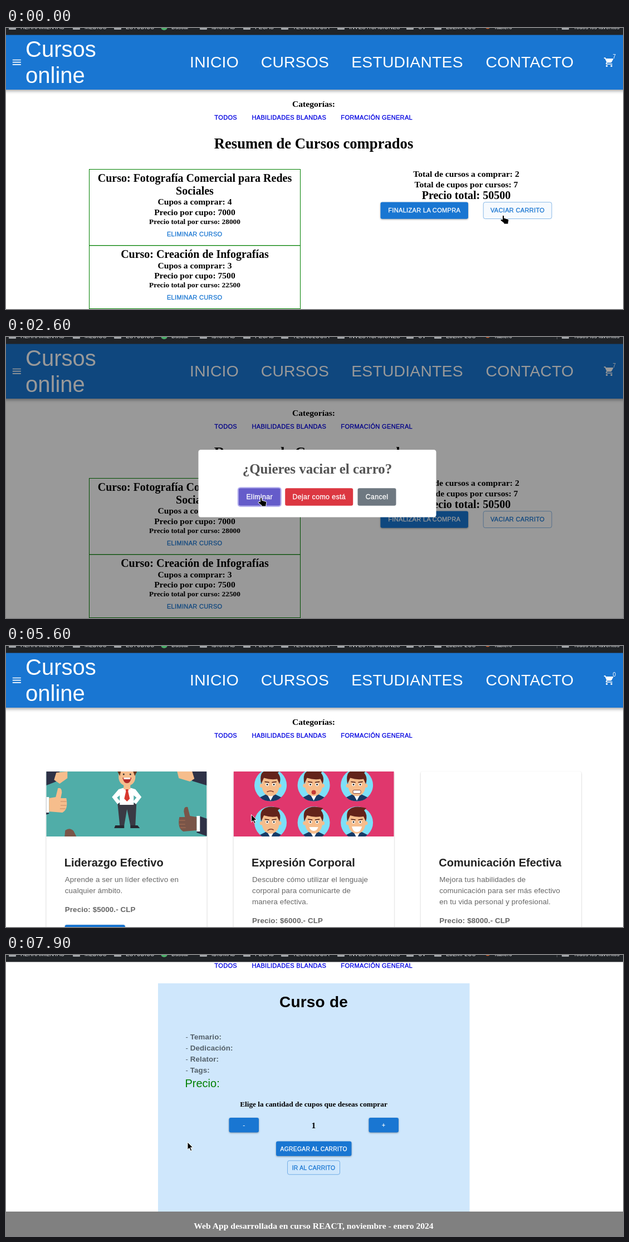
Recreate the animation shown at these times as an HTML page. Size 1108 by 506 pixels, loop 8000 ms.

```html
<!DOCTYPE html>
<html lang="es">
<head>
<meta charset="utf-8">
<title>Cursos online</title>
<style>
  html, body { margin: 0; width: 100%; height: 100%; overflow: hidden; background: #fff; }
  svg { display: block; }
  .sans { font-family: "Liberation Sans", Arial, sans-serif; }
  .serif { font-family: "Liberation Serif", "Times New Roman", serif; font-weight: bold; }
  .label { stroke-width: .3px; letter-spacing: .0286em; }
  .raised { filter: drop-shadow(0 1.5px 1.5px rgba(0,0,0,.35)); }
  .bar { filter: drop-shadow(0 2px 3px rgba(0,0,0,.4)); }
  .card { filter: drop-shadow(0 1px 1px rgba(0,0,0,.28)); }
</style>
</head>
<body>
<svg id="stage" width="1108" height="506" viewBox="0 0 1108 506"></svg>
<script>
const BLUE = '#1976d2', LINK = '#0000e0', MID = 552.5;

// Drawing helpers
const text = (x, y, str, size, { font = 'sans', fill = '#000', anchor = 'middle', more = '' } = {}) =>
  `<text x="${x}" y="${y}" class="${font}" font-size="${size}" fill="${fill}" text-anchor="${anchor}" ${more}>${str}</text>`;
const serif = (x, y, str, size, fill = '#000') => text(x, y, str, size, { font: 'serif', fill });
const label = (x, y, str, fill, size = 11.05) =>
  text(x, y, str, size, { font: 'sans label', fill, more: `stroke="${fill}"` });
const left = (x, y, str, size, fill, more = '') => text(x, y, str, size, { fill, more, anchor: 'start' });
const rect = (x, y, w, h, fill, more = '') =>
  `<rect x="${x}" y="${y}" width="${w}" height="${h}" fill="${fill}" ${more}/>`;
const circle = (x, y, r, fill, more = '') => `<circle cx="${x}" cy="${y}" r="${r}" fill="${fill}" ${more}/>`;
const path = (d, fill, more = '') => `<path d="${d}" fill="${fill}" ${more}/>`;
const line = (d, color, width) =>
  path(d, 'none', `stroke="${color}" stroke-width="${width}" stroke-linecap="round" stroke-linejoin="round"`);
const group = (id, body, more = '') => `<g id="${id}" ${more}>${body}</g>`;
const filled = (x, y, w, h, str, size, id = '') =>
  rect(x, y, w, h, BLUE, `rx="3.3" class="raised" ${id && `id="${id}"`}`) +
  label(x + w / 2, y + h / 2 + 3.8, str, '#fff', size);
const outlined = (x, y, w, h, str, size, id = '') =>
  rect(x, y, w, h, 'transparent', `rx="3.3" stroke="${BLUE}" stroke-opacity=".5" ${id && `id="${id}"`}`) +
  label(x + w / 2, y + h / 2 + 3.8, str, BLUE, size);

// Browser bookmarks strip
function bookmarks() {
  const folders = [[5, 'HERRAMIENTAS'], [120, 'MEDIOS'], [194, 'ESTUDIOS'], [348, 'IDIOMAS'], [426, 'PECAS'],
    [494, 'TECNOLOGIA'], [595, 'INVESTIGACIONES'], [719, 'CV'], [769, 'EJEMPLOS'], [998, 'Todos los favoritos']];
  const name = (x, str) => left(x, 1.6, str, 10, '#e3e5e8');
  return rect(0, 0, 1108, 12.5, '#202327') +
    folders.map(([x, str]) => rect(x, -6, 13, 9, '#a3a6aa', 'rx="1"') + name(x + 21, str)).join('') +
    circle(284, -2, 6, '#4caf6a') + name(297, 'Buscar') +
    circle(865, -3, 4.5, '#d9642f') + name(876, 'Tablero') + rect(989, 0, 1, 4, '#5b5e63');
}

function header() {
  const nav = [[374, 'INICIO'], [519, 'CURSOS'], [720.5, 'ESTUDIANTES'], [940.5, 'CONTACTO']];
  const burger = 'M3 18h18v-2H3zM3 13h18v-2H3zM3 6v2h18V6z';
  const trolley = 'M7 18a2 2 0 1 0 .01 0zM1 2v2h2l3.6 7.6-1.35 2.4C4.5 15.4 5.5 17 7 17h12v-2H7.4l-.2-.4.9-1.6h7.45' +
    'c.75 0 1.4-.4 1.75-1l3.6-6.5c.4-.7-.1-1.5-.9-1.5H5.2l-.9-2zM17 18a2 2 0 1 0 .01 0z';
  return rect(-20, 12, 1150, 99, BLUE, 'class="bar"') +
    path(burger, '#fff', 'transform="translate(9.3 51.7) scale(.833)"') +
    group('brandTwoLines', left(35, 52, 'Cursos', 40, '#fff') + left(35, 99, 'online', 40, '#fff')) +
    group('brandOneLine', left(35, 75.5, 'Cursos online', 40, '#fff')) +
    group('nav', nav.map(([x, str]) => text(x, 71, str, 28.33, { fill: '#fff', more: 'letter-spacing=".2"' })).join('')) +
    group('basket', path(trolley, '#fff', 'transform="translate(1073 51.7) scale(.833)"') +
      text(1092.3, 55, '<tspan id="count">7</tspan>', 10, { fill: '#fff' }));
}

const categories = () => serif(MID, 142, 'Categorías:', 15.6) +
  label(394.7, 164.5, 'TODOS', LINK) + label(508.3, 164.5, 'HABILIDADES BLANDAS', LINK) +
  label(665.7, 164.5, 'FORMACIÓN GENERAL', LINK);

const footer = y => rect(-20, y, 1150, 52, '#808080') +
  serif(MID, y + 31, 'Web App desarrollada en curso REACT, noviembre - enero 2024', 15.6, '#fff');

function cart() {
  const item = (top, h, titles, seats, price, total) => {
    const y = top + 23 * titles.length;
    return rect(149.5, top, 379, h, 'none', 'stroke="#008000"') +
      titles.map((s, i) => serif(339, top + 22.5 + 22.9 * i, s, 20)).join('') +
      serif(339, y + 17.8, `Cupos a comprar: ${seats}`, 15.6) + serif(339, y + 36, `Precio por cupo: ${price}`, 15.6) +
      serif(339, y + 52.3, `Precio total por curso: ${total}`, 13.33) + label(338.7, y + 74, 'ELIMINAR CURSO', BLUE);
  };
  return serif(MID, 217, 'Resumen de Cursos comprados', 26.67) +
    item(254.5, 137, ['Curso: Fotografía Comercial para Redes', 'Sociales'], 4, 7000, 28000) +
    item(391.8, 113.7, ['Curso: Creación de Infografías'], 3, 7500, 22500) +
    serif(826.5, 268, 'Total de cursos a comprar: 2', 15.6) + serif(826.5, 286.5, 'Total de cupos por cursos: 7', 15.6) +
    serif(826.5, 308, 'Precio total: 50500', 20) +
    filled(672.5, 313.5, 157.5, 30.3, 'FINALIZAR LA COMPRA') +
    outlined(857.2, 313.7, 122.8, 29.8, 'VACIAR CARRITO', 11.05, 'emptyButton');
}

const emptyCart = () => serif(MID, 217, 'No hay cursos en el carrito', 26.67) +
  filled(479.5, 265.5, 146, 30.5, 'VOLVER A LA TIENDA', 11.05, 'backButton') + footer(338);

// Card pictures, 288 by 117
const SKIN = '#f6bd8c', SUIT = '#2e3146', BROWN = '#7a5548';
function leaderPicture() {
  const fist = (x, y, skin, dir) => `<g transform="translate(${x} ${y}) scale(${dir} 1)">` +
    path('M-40 2L-10 -8L-6 22L-40 34z', SUIT) + rect(-12, -8, 6, 28, '#fff') +
    path('M-6 -6L6 -8L10 -24Q17 -26 17 -16L15 -6L25 -6Q29 14 18 20L-6 18z', skin) +
    line('M15 0h10M15 7h10M14 13h9', '#b97d58', .8) + '</g>';
  const sleeve = (d, hand) => path(d, SUIT) + hand;
  return rect(0, 0, 288, 117, '#50ada8') +
    sleeve('M0 0H24L18 18L0 25z', path('M18 2L38 0L38 12L24 22L14 15z', SKIN)) +
    sleeve('M288 0H258L262 17L288 25z', path('M262 0H235L238 12L258 18L266 13z', SKIN)) +
    fist(11, 54, SKIN, 1) + fist(264, 88, BROWN, -1) +
    path('M33 117L34 106Q42 100 49 107L54 117z', BROWN) +
    path('M128 57L132 97H140L145 68L151 97H160L162 57z', '#3a3a44') +
    path('M124 97H140V102H122zM151 97H164L168 102H151z', '#27272f') +
    path('M130 32Q145 26 160 32L171 46L161 59L156 54L162 47L157 43V60H132V43L127 47L133 54L128 59L118 46z', '#fff') +
    path('M142 31h6l-1 5 3 13-5 5-5-5 3-13z', '#d8382f') + rect(139, 20, 12, 12, SKIN) +
    path('M130 0H160V12Q158 25 145 26Q132 25 130 12z', SKIN) + path('M128 0H134L132 8zM156 0H163L159 8z', '#6b3920') +
    path('M137 11H153Q151 21 145 21Q139 21 137 11z', '#b32c2a') + rect(139, 11, 12, 3, '#fff') +
    circle(139, 5, 1.5, '#333') + circle(151, 5, 1.5, '#333');
}

function facesPicture() {
  const mouths = [line('M-6 12Q0 9 5 12', '#7a3328', 1.5), circle(0, 13, 4, '#c43b34'),
    rect(-7, 9, 14, 6, '#fff', 'rx="2" stroke="#8a4438"'), line('M-5 14Q0 10 5 13', '#7a3328', 1.5),
    path('M-8 8H8Q6 15 0 15Q-6 15 -8 8z', '#fff'), path('M-9 7H9Q7 17 0 17Q-7 17 -9 7z', '#fff')];
  const face = (mouth, i) => `<g transform="translate(${66.5 + 77.5 * (i % 3)} ${i < 3 ? 24.5 : 92})">` +
    circle(0, 0, 29, '#7ddff8') + path('M-19 22L-7 16H7L19 22Q12 29 0 29Q-12 29 -19 22z', '#173a66') +
    path('M-7 15H7L0 28z', '#fff') + path('M-15 -14H15V6Q12 19 0 20Q-12 19 -15 6z', SKIN) +
    circle(-16, 1, 3.5, SKIN) + circle(16, 1, 3.5, SKIN) +
    path('M-17 -2Q-20 -20 -13 -24Q-4 -32 17 -26L13 -22Q20 -14 16 -2L12 -11Q0 -9 -12 -13z', '#63231a') +
    circle(-6, -1, 2.8, '#fff') + circle(6, -1, 2.8, '#fff') + circle(-6, -1, 1.4, '#222') + circle(6, -1, 1.4, '#222') +
    line('M-10 -6L-3 -5M10 -6L3 -5', '#4a1a12', 1.6) + mouth + '</g>';
  return rect(0, 0, 288, 117, '#e0376d') + mouths.map(face).join('');
}

function boardPicture() {
  const profile = 'M33 117Q34 95 25 77Q9 57 13 27Q18 8 31 -5M99 -5Q113 9 112 31L110 42L121 62Q122 67 113 68' +
    'L115 75L111 79L113 84Q113 98 101 97Q84 93 83 102L85 117';
  const letter = (x, y, str, fill) => text(x, y, str, 15, { font: 'serif', fill });
  return '<defs><radialGradient id="board"><stop offset="0" stop-color="#36665b"/>' +
    '<stop offset="1" stop-color="#1b302d"/></radialGradient></defs>' + rect(0, 0, 288, 117, 'url(#board)') +
    line(profile, '#d8b21e', 1.7) + `<g transform="translate(285 0) scale(-1 1)">${line(profile, '#eef2ef', 1.7)}</g>` +
    letter(28, 43, 'A', '#e8c62e') + letter(97, 43, 'B', '#e8c62e') +
    line('M35 39Q45 38 41 30Q38 22 46 25Q53 50 51 30Q52 19 57 26Q62 55 62 28Q66 16 70 25Q62 50 73 43Q79 18 82 24Q76 50 90 38', '#d8b21e', 1.4) +
    letter(191, 38, 'A', '#f4f4f0') + letter(259, 39, 'B', '#f4f4f0') + line('M200 35H252M248 32l4 3-4 3', '#f4f4f0', 1.3);
}

function shop() {
  const courses = [
    [72.3, leaderPicture(), 'Liderazgo Efectivo', ['Aprende a ser un líder efectivo en', 'cualquier ámbito.'], 5000],
    [408.6, facesPicture(), 'Expresión Corporal', ['Descubre cómo utilizar el lenguaje', 'corporal para comunicarte de', 'manera efectiva.'], 6000],
    [744.8, boardPicture(), 'Comunicación Efectiva', ['Mejora tus habilidades de', 'comunicación para ser más efectivo', 'en tu vida personal y profesional.'], 8000]];
  const card = ([x, picture, title, lines, price], i) => {
    const tx = x + 33.5, y = 425 + 20 * lines.length;
    return rect(x, 226, 288.3, 346, '#fff', 'rx="3.3" class="card"') +
      `<svg id="picture${i}" x="${x}" y="226" width="288.3" height="117">${picture}</svg>` +
      left(tx - 1, 396.7, title, 20, '#212121', 'font-weight="bold"') +
      lines.map((s, n) => left(tx, 425 + 20 * n, s, 13.33, '#666', 'letter-spacing=".125"')).join('') +
      left(tx, y + 13.5, `Precio: $${price}.- CLP`, 13.33, '#666', 'font-weight="bold" letter-spacing=".125"') +
      filled(tx, y + 37, 108, 30.5, 'VER DETALLE', 11.05, `more${i}`);
  };
  return group('cards', courses.map(card).join('')) + group('shopFooter', footer(604)) + group('loadingFooter', footer(226));
}

function detail() {
  const facts = ['Temario', 'Dedicación', 'Relator', 'Tags'];
  const fact = (s, i) => left(322.5, 294 + 20 * i, `- <tspan font-weight="bold">${s}:</tspan>`, 13.33, '#53606a', 'letter-spacing=".1"');
  return rect(273, 193, 559.5, 411, '#cfe7fc') +
    text(MID, 236, 'Curso de', 28, { more: 'font-weight="bold" letter-spacing=".2"' }) + facts.map(fact).join('') +
    left(321.5, 380, 'Precio:', 20, '#008000') + serif(MID, 415, 'Elige la cantidad de cupos que deseas comprar', 13.33) +
    filled(400.5, 435, 53.5, 26.5, '-', 10.3) + serif(MID, 454, '1', 15.6) + filled(651.5, 435, 53.5, 26.5, '+', 10.3) +
    filled(485, 477.5, 135.5, 26.5, 'AGREGAR AL CARRITO', 10.3) +
    outlined(505.5, 512.3, 94, 25, 'IR AL CARRITO', 10.3) + footer(604);
}

// Popups, drawn around the point 559, 263.5
function popups() {
  const button = (x, y, w, str, fill, id) => rect(x, y, w, 31.5, fill, `rx="3.3" id="${id}"`) +
    label(x + w / 2, y + 20, str, '#fff', 12.4);
  const ring = (x, y, w) => rect(x - 1, y - 1, w + 2, 33.5, 'none', 'rx="4.2" stroke="#b7b2ef" stroke-width="2.2"');
  const box = h => rect(-213.5, -h / 2, 427, h, '#fff', 'rx="4.2"');
  return group('ask', box(121.5) + serif(0, -18, '¿Quieres vaciar el carro?', 25, '#545454') +
      ring(-141.3, 8.6, 75) + button(-141.3, 8.6, 75, 'Eliminar', '#7066e0', 'yes') +
      button(-57.8, 8.6, 122, 'Dejar como está', '#dc3741', 'no') + button(72.5, 8.6, 69, 'Cancel', '#6e7881', 'cancel')) +
    group('done', box(237) + circle(0, -48.5, 35, 'none', 'stroke="#a5dc86" stroke-opacity=".3" stroke-width="3.4"') +
      line('M-18 -47L-6 -35L20 -61', '#a5dc86', 4) + serif(0, 40, 'Eliminado!', 25, '#545454') +
      ring(-24, 66, 48) + button(-24, 66, 48, 'OK', '#7066e0', 'ok'));
}

const pointer = () => {
  const edge = 'stroke="#fff" stroke-width="1" stroke-linejoin="round"';
  return group('arrow', path('M0 0V13.5L3.2 10.7L5.6 16L7.8 15L5.5 9.8H9.8z', '#000', edge)) +
    group('hand', path('M-1.6 1.5Q0 -.8 1.6 1.5V5.2L8 7Q10 7.6 9.8 9.5L9 13V16H1V14.3L-5 9.6Q-5.2 6.8 -2.6 7.5L-1.6 8z', '#000', edge));
};

document.getElementById('stage').innerHTML = rect(0, 0, 1108, 506, '#fff') +
  group('page', group('content', categories() + group('cart', cart()) + group('emptyCart', emptyCart()) +
    group('shop', shop()) + group('detail', detail())) + group('header', header())) +
  rect(0, 12, 1108, 494, '#000', 'id="shade"') + popups() + bookmarks() + pointer();

// Timeline: [time, values...]
const SCENES = [[0, 'cart'], [3300, 'emptyCart'], [5100, 'shop'], [7700, 'detail']];
const SHADE = [[0, 0], [400, .2], [500, .4], [3900, .075], [4100, 0]];
const ASK = [[0, 0, 0], [400, .86, .7], [500, 1.03, 1], [600, .97, 1], [700, 1, 1], [3300, .75, .5], [3400, 0, 0]];
const DONE = [[0, 0, 0], [3400, .9, .8], [3500, 1.03, 1], [3600, 1, 1], [3900, .712, .42], [4100, 0, 0]];
const SCROLL = [[0, 0], [7000, 90], [7100, 142]];
const POINTER = [[0, 893, 337], [100, 893, 338], [300, 893, 338], [400, 875, 336], [700, 700, 320], [1000, 520, 305],
  [1100, 482, 303], [1200, 482, 303], [1300, 474, 293], [1400, 468, 291], [1700, 535, 307], [2000, 590, 289],
  [2100, 590, 289], [2200, 560, 288], [2600, 458, 289], [3200, 458, 289], [3600, 537, 338], [4000, 537, 338],
  [4100, 515, 280], [4200, 480, 205], [4300, 480, 205], [4400, 467, 184], [4800, 542, 271], [5100, 543, 272],
  [5700, 420, 310], [5800, 420, 310], [6200, 306, 331], [6400, 306, 331], [6500, 304, 333], [6600, 304, 333],
  [6700, 292, 353], [7200, 292, 353], [7300, 260, 362], [7500, 160, 372], [7800, 160, 372], [7900, 326, 337]];

const $ = id => document.getElementById(id);
const step = (table, t) => table.filter(row => row[0] <= t).pop().slice(1);
function along(table, t) {
  const i = table.findIndex(row => row[0] > t);
  if (i < 0) return table[table.length - 1].slice(1);
  const [a, b] = [table[i - 1], table[i]], k = (t - a[0]) / (b[0] - a[0]);
  return [1, 2].map(n => a[n] + (b[n] - a[n]) * k);
}
const show = (id, on) => $(id).style.display = on ? '' : 'none';
const move = (id, x, y = 0) => $(id).setAttribute('transform', `translate(${x} ${y})`);
const paint = (id, fill) => $(id).setAttribute('fill', fill);

function popup(id, [scale, opacity]) {
  show(id, opacity > 0);
  $(id).setAttribute('transform', `translate(559 263.7) scale(${scale})`);
  $(id).setAttribute('opacity', opacity);
}

function render(now) {
  const t = Math.floor(now % 8000 / 100) * 100;
  const [scene] = step(SCENES, t), [scroll] = step(SCROLL, t), [x, y] = along(POINTER, t);
  const wide = t >= 4100 && t < 5200, loading = t < 5200;
  for (const [, id] of SCENES) show(id, id === scene);
  show('cards', !loading);
  show('shopFooter', !loading);
  show('loadingFooter', loading);
  show('picture2', t >= 5900);
  show('brandOneLine', wide);
  show('brandTwoLines', !wide);
  move('content', wide ? 6.25 : 0);
  move('nav', wide ? 4.5 : 0);
  move('basket', wide ? 12.5 : 0);
  move('page', 0, -scroll);
  $('count').textContent = t < 3300 ? 7 : 0;
  $('shade').setAttribute('opacity', step(SHADE, t)[0]);
  popup('ask', step(ASK, t));
  popup('done', step(DONE, t));

  const over = (x0, y0, x1, y1) => x >= x0 && x <= x1 && y >= y0 && y <= y1;
  const asking = t >= 600 && t < 3400;
  const hover = {
    empty: t < 400,
    yes: asking && over(417, 272, 493, 304),
    no: asking && over(501, 272, 623, 304),
    back: scene === 'emptyCart' && wide && over(485, 265, 632, 296),
    more: scene === 'shop' && scroll === 142 && over(106, 360, 214, 391)
  };
  paint('emptyButton', hover.empty ? 'rgba(25,118,210,.04)' : 'transparent');
  paint('yes', hover.yes ? '#655cca' : '#7066e0');
  paint('no', hover.no ? '#c6323b' : '#dc3741');
  paint('backButton', hover.back ? '#1565c0' : BLUE);
  paint('more0', hover.more ? '#1565c0' : BLUE);
  const hand = Object.values(hover).some(Boolean);
  show('hand', hand);
  show('arrow', !hand);
  move(hand ? 'hand' : 'arrow', x, y);
}

const start = performance.now();
(function tick() {
  render(performance.now() - start);
  requestAnimationFrame(tick);
})();
</script>
</body>
</html>
```
